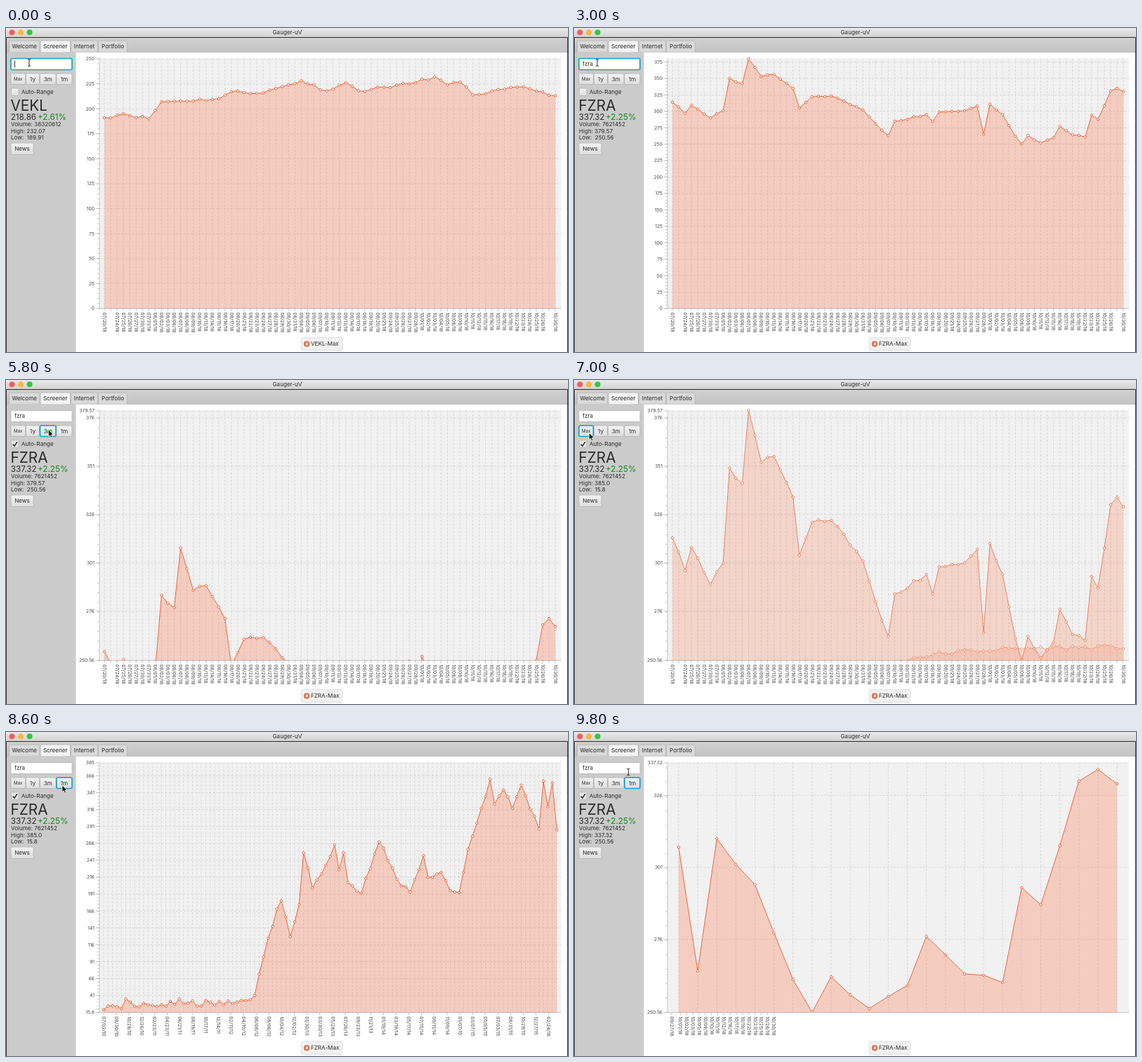
An HTML page for the animation above (9900 ms loop, 800 by 462 pixels).

```html
<!DOCTYPE html>
<html lang="en">
<head>
<meta charset="utf-8">
<title>Gauger-uV</title>
<style>
html, body { margin: 0; width: 100%; height: 100%; overflow: hidden; background: #fff; }
svg { display: block; width: 100vw; height: 100vh; }
text { font-family: Inter, "Open Sans", sans-serif; font-size: 8.1px; fill: #2b2b2b; white-space: pre; }
.mid { text-anchor: middle; }
.ylab { font-size: 6.7px; text-anchor: end; fill: #444; }
.xlab { font-size: 6.8px; fill: #444; }
#symbol { font-size: 20.8px; }
#price, #change { font-size: 11.7px; }
#change { fill: #118a16; }
.grid { fill: none; stroke: #d3d0d0; stroke-width: .8; stroke-dasharray: 3 2.2; }
.tick { fill: none; stroke: #b9b9b9; stroke-width: .8; }
.line { fill: none; stroke: #e8683f; stroke-width: 1; stroke-linejoin: round; }
.area { fill: #f9622d; fill-opacity: .25; }
.dots { fill: #fff; stroke: #ea6237; stroke-width: 1; }
.box { stroke: #b3b3b3; stroke-width: .8; }
.focus { fill: none; stroke: #1a9fd0; stroke-width: 1.6; }
</style>
</head>
<body>
<svg viewBox="0 0 800 462" preserveAspectRatio="none">
  <defs>
    <linearGradient id="bar" x2="0" y2="1"><stop stop-color="#e9e9e9"/><stop offset="1" stop-color="#d3d3d3"/></linearGradient>
    <linearGradient id="btn" x2="0" y2="1"><stop stop-color="#f3f3f3"/><stop offset="1" stop-color="#dedede"/></linearGradient>
    <linearGradient id="head" x2="0" y2="1"><stop stop-color="#d2d2d2"/><stop offset="1" stop-color="#c3c3c3"/></linearGradient>
    <clipPath id="plot"><rect x="133" y="41" width="657" height="359"/></clipPath>
  </defs>
  <rect width="800" height="462" fill="#fff"/>
  <rect y="34" width="99.5" height="428" fill="#cbcbcb"/>
  <rect y="13" width="800" height="21.5" fill="url(#head)"/>
  <path d="M0 34.5H800" stroke="#b4b4b4" stroke-width=".8"/>
  <rect width="800" height="13" fill="url(#bar)"/>
  <path d="M.5 462V13.5H799.5V462" fill="none" stroke="#2a2a2a"/>
  <circle cx="8.4" cy="6.3" r="4" fill="#fc5b57"/>
  <circle cx="21" cy="6.3" r="4" fill="#fdb92f"/>
  <circle cx="33.6" cy="6.3" r="4" fill="#2fc840"/>
  <text class="mid" x="400.5" y="9.3">Gauger-uV</text>
  <g id="ui"></g>

  <rect x="133" y="43.5" width="657" height="356.5" fill="#f1f1f1"/>
  <g id="axes"></g>
  <g id="layers" clip-path="url(#plot)"></g>
  <rect x="420" y="441.5" width="59" height="18" rx="3" fill="#f1f1f1" stroke="#dedede"/>
  <circle cx="428" cy="450.6" r="3" fill="#fff" stroke="#ea5a2b" stroke-width="2"/>
  <text id="legend" x="434" y="453.4"></text>

  <rect class="box" x="7" y="43.5" width="87" height="16" rx="1.5" fill="#fff"/>
  <text id="entry" x="12" y="54.4"></text>
  <path id="caret" d="M12.5 46.5V56.5" stroke="#222" stroke-width=".9"/>
  <rect class="box" x="7.5" y="86" width="10.5" height="10.5" rx="1.5" fill="url(#btn)"/>
  <path id="check" d="M9.6 91.4L12 94.2L16 88.2" fill="none" stroke="#333" stroke-width="1.6"/>
  <text x="22" y="94.4">Auto-Range</text>
  <text id="symbol" x="6.5" y="117.5"></text>
  <text id="price" x="6.7" y="131"></text>
  <text id="change" x="45" y="131"></text>
  <text id="volume" x="7" y="140.2"></text>
  <text id="high" x="7" y="149.6"></text>
  <text id="low" x="7" y="159.2"></text>
  <rect id="focus" class="focus" rx="2"/>
  <g id="cursor">
    <path id="arrow" d="M0 0V9.6L2.2 7.6L3.8 11L5.4 10.3L3.9 7H6.8Z" fill="#000" stroke="#fff" stroke-width=".7"/>
    <path id="beam" d="M-2 -5Q0 -5 0 -3.5Q0 -5 2 -5M0 -3.5V3.5M-2 5Q0 5 0 3.5Q0 5 2 5" fill="none" stroke="#111" stroke-width=".9"/>
  </g>
</svg>
<script>
const LOOP = 9900, BASE = 400, H = 356, STEP = 9.04;
const $ = id => document.getElementById(id);
const clamp = v => Math.max(0, Math.min(1, v));
const ramp = (t, start, len) => clamp((t - start) / len);
const range = (n, f) => Array.from({ length: n }, (_, i) => f(i));

// ease-both with a linear middle part
function ease(p) {
  if (p < .2) return 3.125 * p * p;
  if (p > .8) return 1 - 3.125 * (1 - p) ** 2;
  return 1.25 * p - .125;
}

let seed = 11;
function noise(size) {
  seed = (seed * 16807) % 2147483647;
  return (seed / 2147483647 * 2 - 1) * size;
}

// straight runs between "index:value" key points, roughened in between
function walk(keys, rough) {
  const pts = keys.split(" ").map(k => k.split(":").map(Number));
  return range(pts[pts.length - 1][0] + 1, i => {
    const n = pts.findIndex(p => p[0] >= i), [b, vb] = pts[n];
    if (b === i) return vb;
    const [a, va] = pts[n - 1];
    return va + (vb - va) * (i - a) / (b - a) + noise(rough);
  });
}

const first = walk("0:191 3:195 7:190 9:207 18:210 20:217 25:216 31:228 35:218 38:226 40:218 48:225 52:232 " +
  "54:224 56:227 58:214 66:222 71:213", 1.5);
const second = walk("0:314 2:297 3:309 6:290 8:301 9:350 11:342 12:380 14:353 16:356 19:335 20:305 22:322 25:323 " +
  "30:302 32:281 34:263 35:285 40:295 41:285 42:299 46:301 48:308 49:265 50:311 52:295 54:262 55:250.6 " +
  "56:263 58:252 60:260 61:277 63:264 65:261 66:294 67:288 69:331 70:335 71:330", 1.2);
const years = walk("0:20 4:22 5:36 7:25 16:28 17:36 18:29 29:29 34:41 36:98 39:169 40:181 42:128 44:175 45:252 " +
  "47:200 52:264 53:227 54:252 55:208 58:192 62:268 66:213 69:194 72:248 73:216 76:223 78:196 80:193 82:257 " +
  "84:296 87:361 88:324 90:345 92:318 94:352 98:287 99:358 100:320 101:356 102:286", 5);
const faint = range(36, i => 250.56 + 7 * (1 - Math.exp(-i / 9)) + noise(1.2));

const pad = n => String(n).padStart(2, "0");
const stamp = d => `${pad(d.getMonth() + 1)}/${pad(d.getDate())}/${d.getFullYear() % 100}`;
const days = range(103, i => new Date(2018, 6, 20 + i)).filter(d => d.getDay() % 6).map(stamp).filter(s => s !== "09/03/18");
const dayLabels = days.map((s, i) => [140 + i * STEP, i === 1 || i === 70 ? "" : s]);
const yearLabels = range(36, i => [139 + i * 18.1, stamp(new Date(2010, 6, 2 + Math.round(i * 58.94)))]);
const monthLabels = [[139, days[48]], ...range(16, i => [151.5 + i * 8.85, days[50 + Math.floor(i * 1.4 + .01)]])];

const spread = (from, to, n) => range(n, i => from + i * (to - from) / (n - 1));
const dayXs = spread(140, 782, 72), yearXs = spread(139, 784, 103), monthXs = spread(149, 773, 24);
const steps = (from, to) => range(Math.floor((to - from) / 25) + 1, i => from + i * 25);
const makeAxis = (lo, hi, ticks, xs, labels) => ({ lo, hi, k: H / (hi - lo), ticks, xs, labels });
const axes = {
  first: makeAxis(0, 250, steps(0, 250), dayXs, dayLabels),
  zero: makeAxis(0, 379.8, steps(0, 375), dayXs, dayLabels),
  tight: makeAxis(250.56, 379.57, [250.56, ...steps(276, 376), 379.57], dayXs, dayLabels),
  years: makeAxis(15.8, 385, [15.8, ...steps(41, 366), 385], yearXs, yearLabels),
  month: makeAxis(250.56, 337.32, [250.56, ...steps(276, 326), 337.32], monthXs, monthLabels)
};
const yOf = (axis, v) => BASE - (v - axis.lo) * axis.k;

function axisMarkup(name) {
  const a = axes[name];
  let grid = a.xs.map(x => `M${x} 43.5V400`).join(""), tick = "M133 43.5V400H790", text = "";
  for (const v of a.ticks) {
    const y = yOf(a, v);
    grid += `M133 ${y}H790`;
    tick += `M127.5 ${y}H133`;
    text += `<text class="ylab" x="126" y="${y + 2.4}">${v}</text>`;
  }
  for (let v = a.lo; v <= a.hi; v += 5) tick += `M130 ${yOf(a, v)}H133`;
  for (const [x, s] of a.labels) {
    tick += `M${x} 400V404`;
    text += `<text class="xlab" transform="translate(${x - 2.2} 405.5) rotate(90)">${s}</text>`;
  }
  return `<g id="axis-${name}"><path class="grid" d="${grid}"/><path class="tick" d="${tick}"/><g>${text}</g></g>`;
}
$("axes").innerHTML = Object.keys(axes).map(axisMarkup).join("");
$("layers").innerHTML = '<g><path class="area"/><path class="line"/><path class="dots"/></g>'.repeat(2);
const slots = [...$("layers").children];

const boxes = {
  input: [7, 43.5, 87, 16], check: [7.5, 86, 10.5, 10.5], max: [7, 65, 20.5, 15.5],
  y1: [28.5, 65, 19, 15.5], m3: [48.5, 65, 22.5, 15.5], m1: [72, 65, 22, 15.5], news: [7, 164, 32, 16.5]
};
function button(key, label, size = 8.1) {
  const [x, y, w, h] = boxes[key];
  return `<rect class="box" x="${x}" y="${y}" width="${w}" height="${h}" rx="2" fill="url(#btn)"/>
    <text class="mid" x="${x + w / 2}" y="${y + h / 2 + size * .36}" style="font-size:${size}px">${label}</text>`;
}
function tab(label, x, w, open) {
  return `<path class="box" d="M${x} 34.5V20Q${x} 18 ${x + 2} 18H${x + w - 2}Q${x + w} 18 ${x + w} 20V34.5" fill="${open ? "#f4f4f4" : "#d9d9d9"}"/>
    <text class="mid" x="${x + w / 2}" y="29.4">${label}</text>`;
}
$("ui").innerHTML = tab("Welcome", 4.5, 43.5) + tab("Screener", 49, 42.5, true) + tab("Internet", 92.5, 38) +
  tab("Portfolio", 131.5, 41) + button("max", "Max", 6.2) + button("y1", "1y") + button("m3", "3m") +
  button("m1", "1m") + button("news", "News");

// axis name, then layers of [values, xs, axis, opacity, value multiplier]
function scene(t) {
  const grow = start => ease(ramp(t, start, 800));
  const fade = start => 1 - ramp(t, start, 590);
  const { first: a, zero: z, tight: c, years: y, month: m } = axes;
  if (t < 2400) return ["first", [[first, dayXs, a, 1, 1]]];
  if (t < 4290) return ["zero", [[first, dayXs, z, fade(2200), 1], [second, dayXs, z, 1, grow(2200)]]];
  if (t < 5200) return ["tight", [[second, dayXs, { lo: 0, k: .89 }, fade(4290), 1], [second, dayXs, c, 1, grow(4293)]]];
  if (t < 6880) return ["tight", [[second, dayXs, c, fade(5200), 1], [second, dayXs, c, 1, grow(5200)]]];
  if (t < 7150) return ["tight", [[second, dayXs, c, fade(6880), 1], [faint, dayXs.slice(36), c, ramp(t, 6850, 300), 1]]];
  if (t < 8650) return ["years", [[second, dayXs, c, fade(6880), 1], [years, yearXs, y, 1, grow(6880)]]];
  return ["month", [[years, yearXs, y, fade(8650), 1], [second.slice(48), monthXs, m, 1, grow(8650)]]];
}

function drawLayer(slot, layer) {
  const hidden = !layer || layer[3] <= 0;
  slot.style.display = hidden ? "none" : "";
  if (hidden) return;
  const [vals, xs, axis, alpha, mul] = layer;
  const pts = vals.map((v, i) => [xs[i].toFixed(1), yOf(axis, v * mul).toFixed(1)]);
  const line = "M" + pts.map(p => p.join(" ")).join("L");
  const [area, stroke, dots] = slot.children;
  area.setAttribute("d", `${line}V900H${pts[0][0]}Z`);
  stroke.setAttribute("d", line);
  dots.setAttribute("d", pts.map(([x, y]) => `M${x - 1.7} ${y}a1.7 1.7 0 1 0 3.4 0a1.7 1.7 0 1 0 -3.4 0`).join(""));
  slot.style.opacity = alpha;
}

// [arrival, departure, x, y]
const stops = [[0, 3200, 33, 49.5], [3900, 4350, 12, 90], [4750, 6000, 60.5, 71],
  [6600, 7500, 21.5, 75.5], [8300, 9200, 80, 76], [9700, LOOP, 77.3, 57]];
function pointer(t) {
  const i = stops.findIndex(s => t < s[1]), [arrive, , x, y] = stops[i];
  if (t >= arrive) return [x, y];
  const [, leave, x0, y0] = stops[i - 1];
  const p = ramp(t, leave, arrive - leave), e = p * p * (3 - 2 * p);
  return [x0 + (x - x0) * e, y0 + (y - y0) * e];
}

const show = (id, on) => { $(id).style.display = on ? "" : "none"; };
const put = (id, s) => { if ($(id).textContent !== s) $(id).textContent = s; };
const latest = (t, list) => list.filter(e => e[0] <= t).pop();

function draw(t) {
  const [name, layers] = scene(t);
  for (const key in axes) show("axis-" + key, key === name);
  $("axis-tight").lastChild.style.opacity = ramp(t, 4290, 900);
  slots.forEach((slot, i) => drawLayer(slot, layers[i]));

  const opening = t < 2400, symbol = opening ? "VEKL" : "FZRA";
  put("symbol", symbol);
  put("legend", symbol + "-Max");
  put("price", opening ? "218.86" : "337.32");
  put("change", opening ? "+2.61%" : "+2.25%");
  put("volume", "Volume: " + (opening ? "38320612" : "7621452"));
  const [, high, low] = latest(t, [[0, "232.07", "189.91"], [2400, "379.57", "250.56"],
    [6850, "385.0", "15.8"], [8650, "337.32", "250.56"]]);
  put("high", "High: " + high);
  put("low", "Low:\u00a0 " + low);

  put("entry", "fzra".slice(0, Math.max(0, Math.floor((t - 250) / 250))));
  show("caret", t < 450);
  show("check", t >= 4290);
  const [, held] = latest(t, [[0, "input"], [4290, "check"], [5200, "m3"], [6800, "max"], [8400, "m1"]]);
  ["x", "y", "width", "height"].forEach((k, i) => $("focus").setAttribute(k, boxes[held][i]));

  const [x, y] = pointer(t), overInput = y < 61;
  $("cursor").setAttribute("transform", `translate(${x.toFixed(2)} ${y.toFixed(2)})`);
  show("beam", overInput);
  show("arrow", !overInput);
}

const begin = performance.now();
function tick() {
  const t = (performance.now() - begin) % LOOP;
  draw(Math.floor(t / 100) * 100);
  requestAnimationFrame(tick);
}
tick();
</script>
</body>
</html>
```
